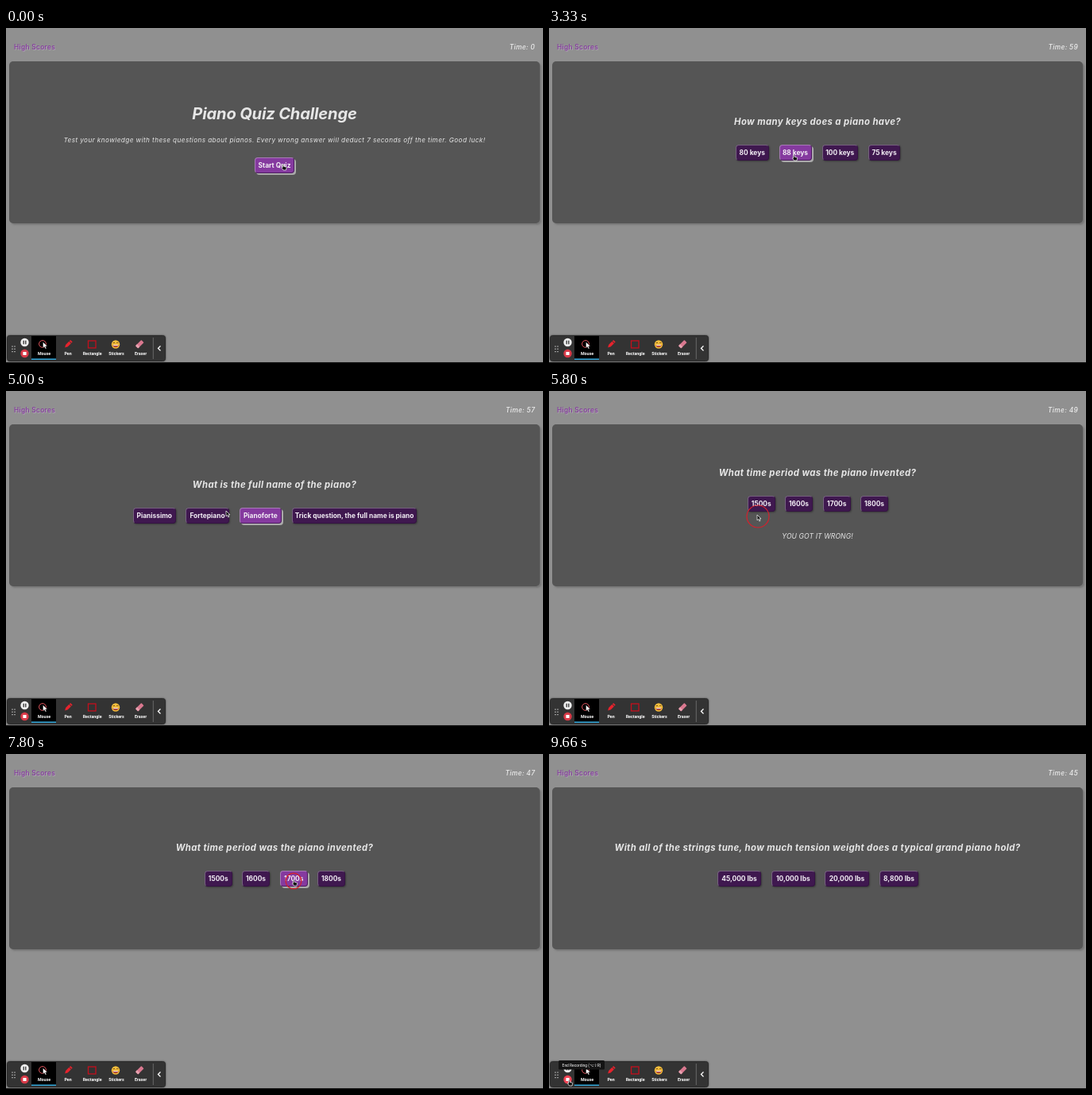
Write an HTML page that moves like this. It is 676x422 px and loops after 9800 ms.

```html
<!DOCTYPE html>
<html lang="en">
<head>
<meta charset="utf-8">
<title>Piano Quiz</title>
<style>
html, body { margin: 0; width: 100%; height: 100%; overflow: hidden; }
body { position: relative; background: #909090; font-family: Inter, "Open Sans", sans-serif; color: #e6e6e6; }
body > *, #quiz > * { position: absolute; white-space: nowrap; }
#scores { left: 10px; top: 18px; font: 500 8.3px/12px Inter, sans-serif; letter-spacing: .35px; color: #853a9f; text-shadow: .8px .8px 0 #b3a3b9; }
#time { right: 10px; top: 18px; font: italic 500 8.3px/12px Inter, sans-serif; letter-spacing: .35px; color: #eee; }
#panel { left: 4px; top: 42px; width: 668px; height: 204px; border-radius: 5px; background: #555; box-shadow: 2px 2px 2px #6669; }
#quiz { left: 0; top: 0; width: 676px; height: 250px; }
.line { left: 0; width: 676px; text-align: center; font-style: italic; }
.title { top: 94px; font-size: 20.2px; line-height: 28px; font-weight: 700; letter-spacing: -.2px; }
.intro { top: 135px; font-size: 8.2px; line-height: 12px; letter-spacing: .41px; }
.question { top: 110px; font-size: 11.3px; line-height: 16px; font-weight: 700; letter-spacing: .41px; }
.result { top: 192px; font-size: 8.6px; line-height: 12px; letter-spacing: .1px; }
.button { box-sizing: border-box; height: 20px; border: 1px solid; border-color: #76627f #351343 #351343 #76627f; border-radius: 4px;
  background: #3f184f; color: #f4f0f6; font-size: 8.4px; font-weight: 700; line-height: 18px; text-align: center; box-shadow: 1px 1px 2px #3a3a3a; }
.hover { background: #853a9f; border-color: #a77ab6 #4d1c60 #4d1c60 #a77ab6; box-shadow: 2px 2px 0 #aaa; }
svg { left: 0; top: 0; width: 676px; height: 422px; }
svg text { font: 700 5.3px Roboto, sans-serif; fill: #fff; text-anchor: middle; }
#tip text { font-size: 4.9px; font-weight: 400; }
#bar { filter: drop-shadow(0 0 1px #444); }
</style>
</head>
<body>
<div id="scores">High Scores</div>
<div id="time"></div>
<div id="panel"></div>
<div id="quiz"></div>
<svg viewBox="0 0 676 422">
  <path d="M0 421.5H676" stroke="#111"/>
  <rect id="bar" x="1.5" y="387.5" width="199" height="32" rx="3" fill="#333" stroke="#2a2a2a"/>
  <path d="M8 400.5v8M11 400.5v8" stroke="#ccc" stroke-width="1.3" stroke-dasharray="1.3 1.9"/>
  <circle cx="23.5" cy="396" r="5.2" fill="#eee"/>
  <path d="M22.2 393.8v4.4M24.8 393.8v4.4" stroke="#222" stroke-width="1.2"/>
  <circle id="stop" cx="23.5" cy="410" r="5.2"/>
  <rect x="21.4" y="407.9" width="4.2" height="4.2" rx=".5" fill="#fff"/>
  <rect x="32" y="388" width="31" height="30" fill="#000"/>
  <path d="M32 417.2h31" stroke="#2f9fd0" stroke-width="1.6"/>
  <circle cx="46" cy="398" r="4.4" fill="none" stroke="#e0545c" stroke-width="1"/>
  <path d="M46.5 395.500v7.500l1.800-1.600 1.300 2.800 1.400-.7-1.300-2.600h2.400z" fill="#fff" stroke="#000" stroke-width=".4"/>
  <g transform="translate(78.300 398.300) rotate(45)" fill="#e5232d">
    <path d="M-1.800-5.800h3.600v1.800h-3.600zM-1.800-3.300h3.600v6l-1.800 3.200-1.800-3.200z"/>
  </g>
  <rect x="103.500" y="394" width="9.500" height="9" fill="none" stroke="#c40f1c" stroke-width="1.300"/>
  <circle cx="138" cy="398.500" r="5.200" fill="#f6c03c"/>
  <path d="M134.600 397l1.500-.8 1.200.9M139 397l1.200-.9 1.500.8" fill="none" stroke="#5b3514" stroke-width=".8"/>
  <path d="M134.500 399h7a3.500 3.300 0 0 1-7 0z" fill="#a32e22"/>
  <path d="M135 399.200h6v1.100h-6z" fill="#fff"/>
  <g transform="translate(168.300 398.300) rotate(-45)">
    <rect x="-5.200" y="-2.300" width="10.400" height="4.600" rx=".8" fill="#d9788f"/>
    <path d="M-5.200-1.500q0-.8.800-.8h2v4.600h-2q-.8 0-.8-.8z" fill="#e8a3b1"/>
  </g>
  <text x="48" y="412">Mouse</text>
  <text x="78" y="412">Pen</text>
  <text x="108.700" y="412">Rectangle</text>
  <text x="139" y="412">Stickers</text>
  <text x="169.500" y="412">Eraser</text>
  <path d="M185.300 390v27" stroke="#777" stroke-width=".8"/>
  <path d="M194.500 400.500l-3 3 3 3" fill="none" stroke="#fff" stroke-width="1.300"/>
  <g id="tip">
    <rect x="12" y="386" width="58" height="11.500" rx="1.500" fill="#141414"/>
    <text x="41" y="393.600">End Recording (⌥⇧R)</text>
  </g>
  <circle id="ripple" fill="none" stroke="#d6202c" stroke-width="1.200"/>
  <g id="cursor" stroke="#fff" stroke-width=".7" fill="#111" stroke-linejoin="round">
    <path id="arrow" d="M0 0v6.800l1.600-1.400 1.200 2.600 1.200-.5-1.200-2.600h2.200z"/>
    <path id="hand" d="M.5 1q.8-1 1.500 0v2.300l3 .7q.8.300.6 1.200l-.6 2.800h-3.400l-2.200-2.900q.1-.9 1.100-.2z"/>
  </g>
</svg>
<script>
const LOOP = 9800, START = 1600, LAG = 100;
const $ = id => document.getElementById(id);

// Each scene starts at a time; buttons are [label, left, right].
const scenes = [
  { at: 0, title: "Piano Quiz Challenge", y: 163, buttons: [["Start Quiz", 313, 363]],
    intro: "Test your knowledge with these questions about pianos. Every wrong answer will deduct 7 seconds off the timer. Good luck!" },
  { at: START, question: "How many keys does a piano have?",
    buttons: [["80 keys", 235, 276.5], ["88 keys", 289.5, 330.5], ["100 keys", 343.5, 389], ["75 keys", 402, 442]] },
  { at: 3420, question: "What is the full name of the piano?", result: "YOU GOT IT RIGHT!",
    buttons: [["Pianissimo", 160, 213.5], ["Fortepiano", 226, 281], ["Pianoforte", 293.5, 347], ["Trick question, the full name is piano", 360, 517]] },
  { at: 5680, question: "What time period was the piano invented?", result: "YOU GOT IT WRONG!",
    buttons: [["1500s", 250, 284.5], ["1600s", 297, 332], ["1700s", 345, 379.5], ["1800s", 392, 427]] },
  { at: 7860, question: "With all of the strings tune, how much tension weight does a typical grand piano hold?", result: "YOU GOT IT RIGHT!",
    buttons: [["45,000 lbs", 212, 267], ["10,000 lbs", 280, 334.5], ["20,000 lbs", 347, 403], ["8,800 lbs", 416, 465]] }
];
const clicks = [1530, 3360, 5660, 7760];
const path = [
  [0, 347.5, 171], [300, 346, 171], [660, 344, 172], [1130, 342, 172], [2000, 342, 172],
  [2500, 352, 163], [2930, 309, 160], [3060, 307, 159], [3700, 307, 159], [4260, 322, 158],
  [4700, 320, 156], [4900, 306, 153], [5000, 277, 151], [5260, 264, 155], [5460, 262, 156],
  [5900, 262, 156], [6660, 279, 200], [7460, 361, 158], [7900, 361, 158], [8800, 109, 360],
  [9400, 24, 410], [LOOP, 24, 410]
];

function cursorAt(t) {
  const i = Math.max(1, path.findIndex(p => p[0] > t));
  const [t0, x0, y0] = path[i - 1], [t1, x1, y1] = path[i];
  const u = Math.max(0, (t - t0) / (t1 - t0)), e = u * u * (3 - 2 * u);
  return [x0 + (x1 - x0) * e, y0 + (y1 - y0) * e];
}

const line = (kind, text) => text ? `<div class="line ${kind}">${text}</div>` : "";

let drawn = "";
function drawQuiz(scene, result, shift, hovered) {
  const key = [scene.at, result, hovered].join();
  if (key === drawn) return;
  drawn = key;
  const buttons = scene.buttons.map(([label, left, right], i) =>
    `<div class="button${i === hovered ? " hover" : ""}" style="left:${left}px;top:${scene.y || 147}px;width:${right - left}px">${label}</div>`);
  $("quiz").innerHTML = line("title", scene.title) + line("intro", scene.intro) +
    line("question", scene.question) + buttons.join("") + line("result", result);
  $("quiz").style.top = shift + "px";
}

function show(el, on) { el.style.display = on ? "" : "none"; }

function draw(t) {
  const scene = scenes.findLast(s => s.at <= t);
  const result = t < scene.at + 960 ? scene.result || "" : "";
  const shift = result ? -15 : 0;
  const top = (scene.y || 147) + shift;
  const over = ([x, y]) => scene.buttons.findIndex(([, l, r]) => x > l && x < r && y > top && y < top + 20);
  const [x, y] = cursorAt(t);
  const hovered = over(cursorAt(t - LAG));
  drawQuiz(scene, result, shift, hovered);

  const penalty = t >= 5680 ? 7 : 0;
  const seconds = t < START ? 0 : 60 - Math.floor((t - START) / 1000) - penalty;
  $("time").textContent = "Time: " + seconds;

  const inBar = y > 387;
  const hand = inBar || (hovered >= 0 && hovered === over([x, y]));
  $("cursor").setAttribute("transform", `translate(${x} ${y})`);
  show($("arrow"), !hand);
  show($("hand"), hand);
  show($("tip"), t >= 9500);
  $("stop").setAttribute("fill", inBar && x < 30 ? "#f04455" : "#d93a48");

  const down = clicks.find(c => t >= c && t < c + 300);
  show($("ripple"), down !== undefined);
  if (down !== undefined) {
    const u = (t - down) / 300, [cx, cy] = cursorAt(down);
    const values = { cx: cx + 1, cy: cy + 2, r: 14 * Math.min(1, .5 + u * 1.5), opacity: Math.min(1, 2.5 * (1 - u)) };
    for (const name in values) $("ripple").setAttribute(name, values[name]);
  }
}

const begin = performance.now();
function tick() {
  draw((performance.now() - begin) % LOOP);
  requestAnimationFrame(tick);
}
tick();
</script>
</body>
</html>
```
